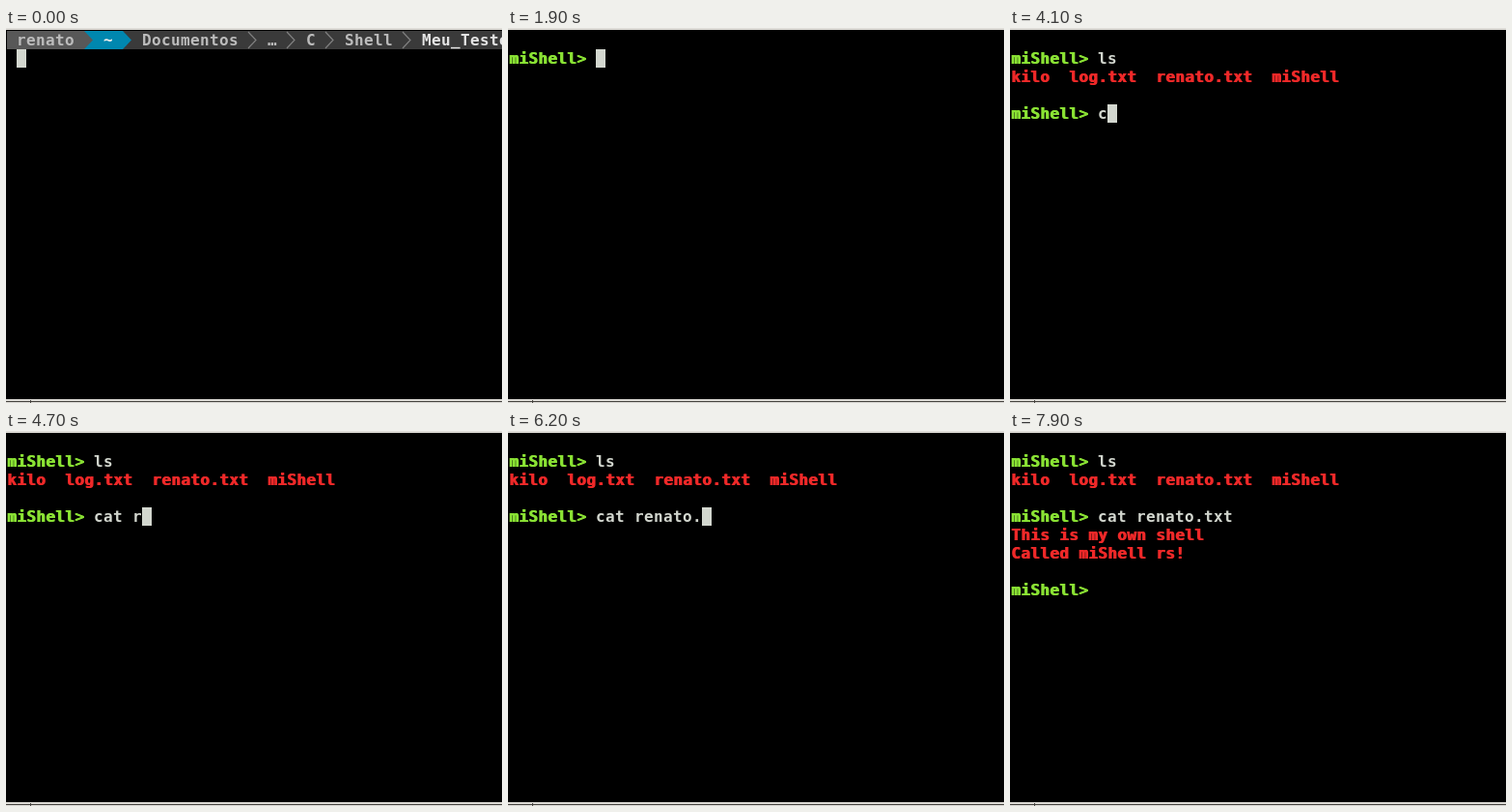
Write an HTML page that moves like this. It is 514 px wide and 388 px high and loops after 8 s.

```html
<!DOCTYPE html>
<html lang="pt">
<head>
<meta charset="utf-8">
<title>miShell</title>
<style>
  html, body { margin: 0; width: 100%; height: 100%; overflow: hidden; background: #000; }
  svg { display: block; width: 514px; height: 388px; }
  text {
    font: bold 16px "DejaVu Sans Mono", "Liberation Mono", monospace;
    letter-spacing: .368px;
    white-space: pre;
  }
</style>
</head>
<body>
<svg id="stage" viewBox="0 0 514 388" xmlns="http://www.w3.org/2000/svg"></svg>
<script>
const LOOP = 8000, BLINK = 600, CELL = 10, LINE = 19;
const FG = "#d3d7cf", GREEN = "#8ae234", RED = "#ef2929";
const stage = document.getElementById("stage");
const colX = c => 1 + c * CELL;
const rowY = r => 3 + r * LINE;

function add(parent, tag, attrs, content) {
  const el = document.createElementNS("http://www.w3.org/2000/svg", tag);
  for (const key in attrs) el.setAttribute(key, attrs[key]);
  if (content !== undefined) el.textContent = content;
  parent.appendChild(el);
  return el;
}
const group = () => add(stage, "g", {});
const rect = (parent, x, y, width, height, fill) =>
  add(parent, "rect", { x, y, width, height, fill });
const write = (parent, col, row, str, fill = FG) =>
  add(parent, "text", { x: colX(col), y: rowY(row) + 15, fill }, str);

// Bold terminal text is struck twice, one pixel apart.
function strong(parent, col, row, str, fill) {
  write(parent, col, row, str, fill);
  write(parent, col, row, str, fill).setAttribute("dx", 1);
}
const prompt = (parent, row) => strong(parent, 0, row, "miShell>", GREEN);

function drawHeader(g) {
  const top = rowY(0);
  const block = (from, to, fill) =>
    rect(g, colX(from), top, (to - from) * CELL, LINE, fill);
  const arrow = (col, fill) =>
    add(g, "path", { d: `M${colX(col)} ${top}l9 9.5l-9 9.5z`, fill });
  const chevron = col =>
    add(g, "path", { d: `M${colX(col)} ${top + 1}l8 8.5l-8 8.5`, fill: "none", stroke: "#808080", "stroke-width": 1.2 });

  block(0, 8, "#585858");
  block(8, 12, "#0087af");
  block(12, 52, "#3a3a3a");
  arrow(8, "#585858");
  arrow(12, "#0087af");
  [25, 29, 33, 41].forEach(chevron);
  write(g, 1, 0, "renato", "#bcbcbc");
  write(g, 10, 0, "~", "#eeeeec");
  [[14, "Documentos"], [27, "…"], [31, "C"], [35, "Shell"]]
    .forEach(([col, str]) => write(g, col, 0, str, "#bcbcbc"));
  write(g, 43, 0, "Meu_Teste", "#e4e4e4");
}

// Each command: cell where typing starts, time span of its line, key times, run time.
const commands = [
  { col: 1, row: 1, start: 0, run: 1000, gone: 1850,
    keys: [[100, "."], [500, "./"], [600, "./m"], [700, "./mi"], [800, "./miShell"]] },
  { col: 9, row: 3, start: 1000, run: 1850, gone: 1850,
    keys: [[1200, "c"], [1300, "cl"], [1400, "cle"], [1600, "clea"], [1700, "clear"]] },
  { col: 9, row: 1, start: 1850, run: 2600, gone: LOOP,
    keys: [[2300, "l"], [2400, "ls"]] },
  { col: 9, row: 4, start: 2600, run: 7300, gone: LOOP,
    keys: [[4100, "c"], [4200, "ca"], [4400, "cat"], [4500, "cat "], [4700, "cat r"],
           [5300, "cat re"], [5600, "cat ren"], [5800, "cat rena"], [5900, "cat renat"],
           [6100, "cat renato"], [6200, "cat renato."], [6500, "cat renato.t"],
           [6700, "cat renato.tx"], [6900, "cat renato.txt"]] },
  { col: 9, row: 8, start: 7300, run: LOOP, gone: LOOP, keys: [] }
];

rect(stage, 0, 0, 514, 388, "#000");

const header = group();
drawHeader(header);

const listing = group();
strong(listing, 0, 2, "kilo  log.txt  renato.txt  miShell", RED);

const printed = group();
strong(printed, 0, 5, "This is my own shell", RED);
strong(printed, 0, 6, "Called miShell rs!", RED);

for (const cmd of commands) {
  cmd.g = group();
  if (cmd.col === 9) prompt(cmd.g, cmd.row);
  cmd.text = write(cmd.g, cmd.col, cmd.row, "");
}
const cursor = rect(stage, 0, 0, CELL, LINE, FG);

// Window edges
rect(stage, 0, 0, 514, 2, "#dcdad5");
rect(stage, 0, 384, 514, 2, "#dcdad5");
rect(stage, 0, 386, 514, 1, "#45433f");
rect(stage, 0, 387, 514, 1, "#dcdad5");
rect(stage, 25, 385, 1, 3, "#45433f");

const show = (el, on) => el.setAttribute("visibility", on ? "visible" : "hidden");

function render(t) {
  show(header, t < 1850);
  show(listing, t >= 2600);
  show(printed, t >= 7300);

  for (const cmd of commands) {
    show(cmd.g, t >= cmd.start && t < cmd.gone);
    const [last, typed] = cmd.keys.filter(([at]) => at <= t).pop() || [cmd.start, ""];
    if (cmd.text.textContent !== typed) cmd.text.textContent = typed;
    if (t >= cmd.start && t < cmd.run) {
      cursor.setAttribute("x", colX(cmd.col + typed.length));
      cursor.setAttribute("y", rowY(cmd.row));
      show(cursor, Math.floor((t - last) / BLINK) % 2 === 0);
    }
  }
}

const began = performance.now();
function tick() {
  render((performance.now() - began) % LOOP);
  requestAnimationFrame(tick);
}
render(0);
requestAnimationFrame(tick);
</script>
</body>
</html>
```
